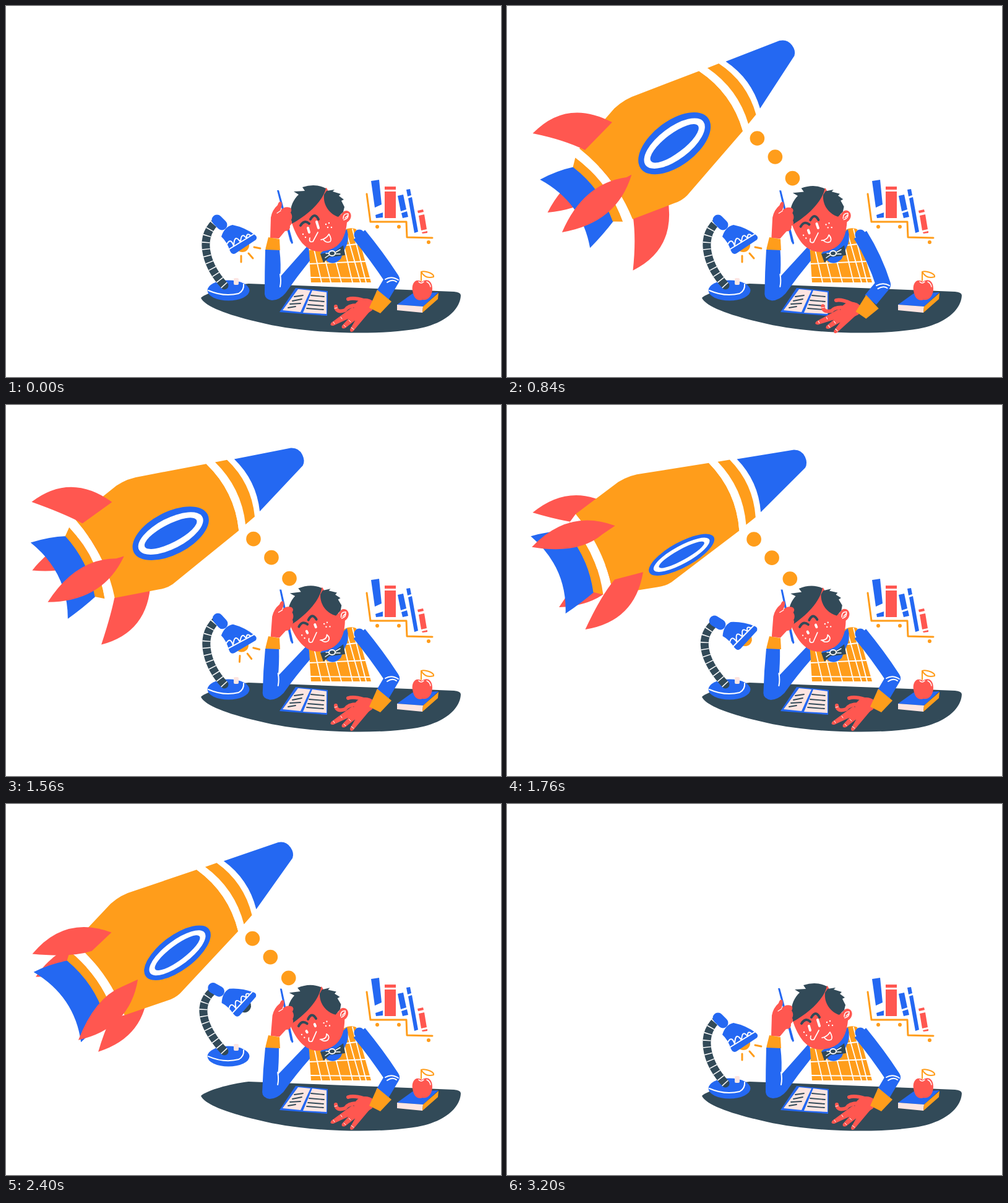
An HTML page for the animation above (3240 ms loop, 800 px wide and 600 px high).

```html
<!DOCTYPE html>
<html lang="en">
<head>
<meta charset="utf-8">
<title>Daydreaming student</title>
<style>
html, body { margin: 0; width: 100%; height: 100%; overflow: hidden; background: #fff; }
svg { display: block; width: 800px; height: 600px; }
.b { fill: #2468f2; } .o { fill: #ff9d1b; } .r { fill: #ff5750; }
.d { fill: #324a58; } .p { fill: #fde5e2; } .w { fill: #fff; }
.l { fill: none; stroke: #fff; stroke-width: 2; stroke-linecap: round; stroke-linejoin: round; }
.lo { stroke: #ff9d1b; } .ld { stroke: #324a58; } .lb { stroke: #2468f2; }
.lr { stroke: #ff5750; }
</style>
</head>
<body>
<svg viewBox="0 0 800 600">
  <g id="shelf">
    <path class="l lo" style="stroke-width:3" d="M583 304L589 349H647L648 374L689 375"/>
    <g class="o"><circle cx="600" cy="357" r="3"/><circle cx="635" cy="357" r="3"/><circle cx="683" cy="382" r="3"/></g>
    <path class="b" d="M590 283L603 281L607 321L596 326ZM597 338L609 334L609 342L598 343ZM633 307L642 305L647 329L638 332ZM639 335L648 332L650 341L641 343ZM647 297L653 296L655 306L649 308ZM650 311L656 309L666 365L660 367Z"/>
    <path class="r" d="M612 292H630V297H612ZM612 300H630V343H612ZM665 331L674 329L675 333L666 335ZM667 339L676 337L680 361L671 363ZM672 366L681 364L681 367L673 368Z"/>
  </g>

  <path class="d" d="M315 472C325 463 360 453 392 449L724 462Q735 463 735 468C734 492 708 514 665 522C600 533 490 530 420 514C370 503 322 488 315 472Z"/>

  <g id="lamp">
    <ellipse class="b" cx="359.500" cy="460" rx="34" ry="16.500"/>
    <path class="l" d="M327 460Q352 471 376 465Q385 460 384 450"/>
    <rect class="p" x="368" y="440" width="8" height="11" rx="2"/>
    <path class="l ld" id="neck" style="stroke-width:13"/>
    <path class="l" id="rings" style="stroke-linecap:butt;stroke-width:13" stroke-dasharray="1.500 9.500"/>
    <g id="shade">
      <path class="l lb" style="stroke-width:17" d="M341 346L349 354"/>
      <circle id="bulb" cx="382" cy="387" r="11"/>
      <path class="b" d="M348 373Q353 357 366 354Q386 358 402 370Q407 373 404 378L371 400Q365 403 362 396Q357 381 348 373Z"/>
      <path class="l" d="M361 393L400 369M357 385Q363 374 368 388Q369 367 379 382Q380 364 389 376Q388 366 395 371"/>
      <path class="l lo" id="rays" style="stroke-width:3" d="M380 404V414M392 400L399 408M401 390L411 392"/>
    </g>
  </g>

  <g id="torso">
    <path class="o" d="M489 388L552 360Q560 358 566 361L590 447H493Z"/>
    <path class="l" style="stroke-width:1.800" d="M489 394L575 384M489 417L582 413M491 439L589 440M497 390L510 447M512 395L525 447M531 405L542 447M547 392L560 447M550 366L573 447M560 361L582 447"/>
    <path class="b" d="M551 361Q556 378 548 392L541 409Q529 421 518 412L508 400L530 380Z"/>
    <path class="d" d="M508 401L524 398L533 396L545 387L548 403L533 405L523 406L513 415Z"/>
    <ellipse class="l" cx="527" cy="400" rx="5" ry="4"/>
    <path class="l" style="stroke-width:1.500" d="M517 400L522 400M516 407L522 403M533 398L540 394M533 401L540 401"/>
  </g>

  <g id="notebook">
    <path class="b" d="M468 456L520 461L519 501L442 495Z"/>
    <path class="p" d="M472 458L492 460L476 495L447 492ZM495 460L518 463L518 498L480 496Z"/>
    <path class="l ld" style="stroke-width:1.800" d="M466 470L480 468M463 477L478 474M459 482L476 481M456 488L468 486M493 468L514 470M490 476L514 478M488 483L513 485M486 489L513 491"/>
    <path class="p" id="page"/>
    <path class="l ld" id="print" style="stroke-width:1.800"/>
  </g>

  <g id="snack">
    <path class="b" d="M632 483L657 465L699 463L674 486Z"/>
    <path class="p" d="M632 483L674 486L673 496L632 492Z"/>
    <path class="o" d="M674 486L699 464L698 474L673 496Z"/>
    <path class="r" d="M672 446C662 439 655 449 657 460C659 473 665 478 673 475C683 477 689 468 689 457C689 444 680 440 672 446Z"/>
    <path class="l lo" d="M671 444L671 430Q676 428 686 432Q692 435 691 438Q678 442 671 430"/>
    <path class="l" style="stroke-width:1.500" d="M667 446Q671 450 675 446M680 446Q685 448 686 454"/>
  </g>

  <path class="b" id="leftArm"/>
  <path class="l" id="fold"/>

  <g id="head">
    <path class="r" d="M462 351C470 376 484 397 506 397C532 396 548 384 551 350C560 345 560 332 550 331Q545 331 541 338L518 294Q478 310 462 351Z"/>
    <path class="d" d="M462 352C456 334 461 316 473 305L465 300L483 299L479 293Q500 286 517 295C512 316 488 338 462 352Z"/>
    <path class="d" d="M518 299L531 297L528 300L541 304L538 307L546 313L542 315L547 325L545 333L537 341C524 337 512 323 514 305Z"/>
    <path class="l ld" style="stroke-width:4" d="M476 355Q482 345 490 352M492 345Q499 333 505 345"/>
    <path class="l" id="eyes" style="stroke-width:4"/>
    <path class="l" style="stroke-width:1.700" d="M504 366L496 381Q489 383 491 375"/>
    <path class="l" d="M545 344Q545 335 553 336Q554 344 546 346M548 343L552 339" style="stroke-width:1.500"/>
    <path class="l" id="mouth" style="stroke-width:1.700"/>
    <g class="w"><circle cx="517" cy="353" r="1.200"/><circle cx="522" cy="351" r="1.200"/><circle cx="520" cy="358" r="1.200"/><circle cx="526" cy="358" r="1.200"/><circle cx="480" cy="369" r="1.200"/><circle cx="484" cy="374" r="1.200"/></g>
  </g>

  <g id="fist">
    <path class="b" d="M438 298L441 298L464 383L462 385L459 380Z"/>
    <path class="r" d="M427 375L428 342Q430 330 439 322Q441 315 445 317Q447 322 443 331Q450 323 459 326Q463 329 460 334Q464 340 461 346Q464 352 459 355Q460 364 451 364L441 376Z"/>
    <path class="l" style="stroke-width:1.200" d="M444 331L438 335"/>
  </g>
  <path class="o" d="M424 374L442 377L443 395L419 394Z"/>
  <path class="l" style="stroke-width:1.500" d="M413 392L419 393"/>

  <path class="l lb" id="rightArm" style="stroke-width:24;stroke-linecap:butt"/>
  <circle class="b" id="shoulder" cx="571" cy="370" r="8.500"/>
  <path class="l" id="elbow"/>
  <g id="hand">
    <path class="r" d="M594 478Q585 471 574 474Q561 480 562 494L575 503L592 492Z"/>
    <path class="l lr" style="stroke-width:6" d="M578 476Q562 471 553 474M568 484Q553 484 548 492Q534 497 533 486"/>
    <path class="r" d="M560 487L526 512Q522 517 529 517L572 497ZM566 492L543 517Q541 523 548 521L579 497ZM572 495L556 523Q556 529 561 526L587 495Z"/>
    <path class="l" style="stroke-width:1" d="M529 511L531 514M546 516L549 519M558 520L562 523M531 489L535 488M541 503L543 506M554 508L557 511"/>
    <path class="o" d="M600 459L623 478L605 497L587 488Z"/>
  </g>

  <g class="o" id="dots"><circle/><circle/><circle/></g>
  <g id="rocket"></g>
</svg>
<script>
const LOOP = 3240;
const $ = id => document.getElementById(id);
const set = (id, name, value) => $(id).setAttribute(name, value);
const clamp = x => Math.min(1, Math.max(0, x));
const ramp = (t, a, b) => clamp((t - a) / (b - a));
const mix = (a, b, p) => a + (b - a) * p;
const smooth = p => (1 - Math.cos(Math.PI * p)) / 2;
const linear = p => p;

// Blend two paths that share the same commands
function blend(from, to, p) {
  const goal = to.match(/-?[\d.]+/g);
  let i = 0;
  return from.replace(/-?[\d.]+/g, n => mix(+n, +goal[i++], p).toFixed(2));
}

// Eased value from [time, value] pairs
function keyed(t, keys, ease = smooth) {
  if (t <= keys[0][0]) return keys[0][1];
  for (let i = 1; i < keys.length; i++) {
    const [t0, v0] = keys[i - 1], [t1, v1] = keys[i];
    if (t < t1) return mix(v0, v1, ease((t - t0) / (t1 - t0)));
  }
  return keys[keys.length - 1][1];
}

const BODY = `
  <path class="b" d="M-298 -54Q-325 -66 -355 -70Q-322 0 -355 67Q-325 62 -298 54Q-282 0 -298 -54Z"/>
  <path class="o" d="M-288 -65L-300 -55Q-284 0 -300 54L-287 64Q-268 0 -288 -65Z"/>
  <path class="w" d="M-274 -73L-288 -65Q-268 0 -287 64L-272 70Q-254 0 -274 -73Z"/>
  <path class="o" d="M-274 -73L-190 -92Q-168 -95 -147 -88L-44 -60Q-22 0 -44 60L-178 91Q-190 93 -202 89L-272 70Q-254 0 -274 -73Z"/>
  <path class="w" d="M-44 -60L0 -47Q16 0 0 47L-44 60Q-22 0 -44 -60Z"/>
  <path class="o" d="M-30 -56L-11 -51Q8 0 -11 51L-30 56Q-10 0 -30 -56Z"/>
  <path class="b" d="M0 -47L90 -23Q102 -18 102 -5Q102 6 95 11L0 47Q17 0 0 -47Z"/>`;

const FIN_FLAT = "M-235 0Q-305 45 -386 0Q-305 -45 -235 0Z";
const FIN_SIDE = "M-202 87Q-234 166 -311 157Q-283 120 -273 75Z";

// Position around the hull in quarter turns: 0 faces us, 1 is below, -1 above
const around = q => ((q + 2) % 4 + 4) % 4 - 2;

function fin(v) {
  const side = Math.abs(v), p = side > 1 ? 2 - side : side;
  return `<path class="r" transform="scale(1 ${v < 0 ? -1 : 1})" d="${blend(FIN_FLAT, FIN_SIDE, p)}"/>`;
}

function porthole(v) {
  const side = Math.abs(v);
  if (side > 1.3) return "";
  const y = 87 * Math.sign(v) * (side > 1 ? 2 - side : side), edge = Math.min(1, side);
  const a = 70 - 16 * edge, b = 40 - 30 * edge;
  const ring = (c, x, z) => `<ellipse class="${c}" rx="${a * x}" ry="${b * z}"/>`;
  return `<g transform="translate(-145 ${y}) rotate(${-7 * v})">` +
    ring("b", 1, 1) + ring("w", .86, .71) + ring("b", .7, .43) + "</g>";
}

function drawRocket(t, h) {
  const grow = 1 - (1 - ramp(t, 280, 620)) ** 2;
  const size = grow * (1 - ramp(t, 2440, 2720) ** 2);
  const tilt = keyed(t, [[560, -27.2], [880, -36.5], [1790, -24.2], [2300, -34.4], [2800, -30]]);
  const turn = keyed(t, [[795, 0], [1160, 1], [1560, 2.18], [2000, 3.23], [2400, 4.39], [2800, 5.5]], linear);
  let back = "", front = "";
  for (const k of [0, 2]) {
    const v = around(turn + k);
    if (Math.abs(v) > .95) back += porthole(v); else front += porthole(v);
  }
  for (const k of [2, 1, 3, 0]) {
    const v = around(turn + k);
    if (Math.abs(v) >= 1) back += fin(v); else front += fin(v);
  }
  // Front parts fade in as the rocket arrives
  front = front.replace(/ transform="(?=translate|scale)/g, ` opacity="${ramp(t, 440, 610)}"$&`);
  $("rocket").innerHTML = size > .01 ? back + BODY + front : "";
  set("rocket", "transform",
    `translate(${397 - 10.5 * h} ${194.5 + 7.2 * h}) rotate(${tilt}) scale(${size}) translate(32 -63)`);
}

function drawDots(t, h) {
  [[409, 211.3, 240, 2660], [438, 241.3, 160, 2700], [465, 276.5, 80, 2900]].forEach(([x, y, start, end], i) => {
    const dot = $("dots").children[i], drift = i < 2 ? 11 : 8.5;
    dot.setAttribute("cx", x - drift * h);
    dot.setAttribute("cy", y + (i < 2 ? 6.5 : 5) * h);
    dot.setAttribute("r", 11.8 * ramp(t, start, start + 120) * (1 - ramp(t, end, end + (i < 2 ? 100 : 240))));
  });
}

function drawLamp(t) {
  const bend = keyed(t, [[1400, 0], [1580, -.1], [1960, 1], [2080, 1], [2400, .45], [2560, 0], [2680, .3], [2800, 0]]);
  const hop = -52 * Math.sin(Math.PI * ramp(t, 2100, 2680));
  const neck = blend("M353 452C328 425 308 380 338 350", "M353 452C318 415 300 384 327 361", bend);
  set("neck", "d", neck);
  set("rings", "d", neck);
  set("lamp", "transform", `translate(0 ${hop})`);
  set("shade", "transform", `translate(${-12 * bend} ${5 * bend}) rotate(${-34 * bend} 345 350)`);
  set("bulb", "class", t > 2200 && t < 2720 ? "d" : "o");
  set("rays", "opacity", t < 1700 ? 1 : ramp(t, 2840, 3000));
}

function drawStudent(t, h) {
  set("head", "transform", `translate(0 ${2 * h}) rotate(${-4.5 * h} 505 397)`);
  set("fist", "transform", `rotate(${3 * h} 431 393)`);
  set("eyes", "d", blend("M488 359L490 366M502 349L505 359", "M488 364L489 366M502 354L503 357", h));
  set("mouth", "d", blend("M509 378Q517 377 522 369Q527 377 524 381Q518 384 513 378",
    "M509 379Q520 380 520 371Q526 376 521 381Q516 384 511 380", h));
  set("leftArm", "d", blend(
    "M419 394L442 394Q445 420 443 438L489 386L491 412Q470 438 452 464Q442 476 430 476Q419 475 418 466Q418 430 419 394Z",
    "M419 394L441 394Q441 420 439 438L489 386L491 412Q468 438 448 466Q437 477 426 477Q414 475 414 466Q415 430 419 394Z", h));
  set("fold", "d", blend("M443 434Q445 445 443 454", "M439 434Q441 445 439 454", h));

  const go = ramp(t, 120, 560), home = ramp(t, 640, 1080);
  const reach = smooth(go) * (1 - smooth(home));
  const dip = 10 * Math.sin(Math.PI * go) + 2 * Math.sin(Math.PI * home);
  set("rightArm", "d", blend("M571 370Q599 404 624 442L608 469", "M571 370Q592 412 596 457L572 480", reach));
  set("elbow", "d", blend("M613 442Q623 436 634 443M616 447Q625 441 631 446",
    "M585 460Q596 454 606 459M587 465Q596 460 602 464", reach));
  set("hand", "transform", `translate(${-39 * reach} ${12 * reach + dip}) rotate(${13.4 * reach} 605 478)`);

  const flip = ramp(t, 300, 700), lift = 12 * Math.sin(Math.PI * flip);
  const turning = flip > 0 && flip < 1;
  const topX = mix(518, 472, flip), topY = mix(463, 458, flip) - lift;
  const lowX = mix(518, 447, flip), lowY = mix(498, 492, flip) - lift;
  set("page", "d", turning ? `M494 460L${topX} ${topY}L${lowX} ${lowY}L478 496Z` : "M0 0");
  let lines = "M0 0";
  if (turning) for (let i = 1; i < 5; i++) {
    const s = i / 5, x0 = mix(494, 478, s), y0 = mix(460, 496, s);
    const x1 = mix(topX, lowX, s), y1 = mix(topY, lowY, s);
    lines += `M${mix(x0, x1, .2)} ${mix(y0, y1, .2)}L${mix(x0, x1, .8)} ${mix(y0, y1, .8)}`;
  }
  set("print", "d", turning ? lines : "");
}

function frame(now) {
  const t = now % LOOP, p = ramp(t, 0, 2300);
  // Slow slump to the left, then a quicker return
  const h = t < 2300 ? (Math.sin(p * Math.PI / 2) + smooth(p)) / 2 : 1 - smooth(ramp(t, 2300, 3200));
  drawLamp(t);
  drawStudent(t, h);
  drawDots(t, h);
  drawRocket(t, h);
  requestAnimationFrame(frame);
}
frame(0);
</script>
</body>
</html>
```
